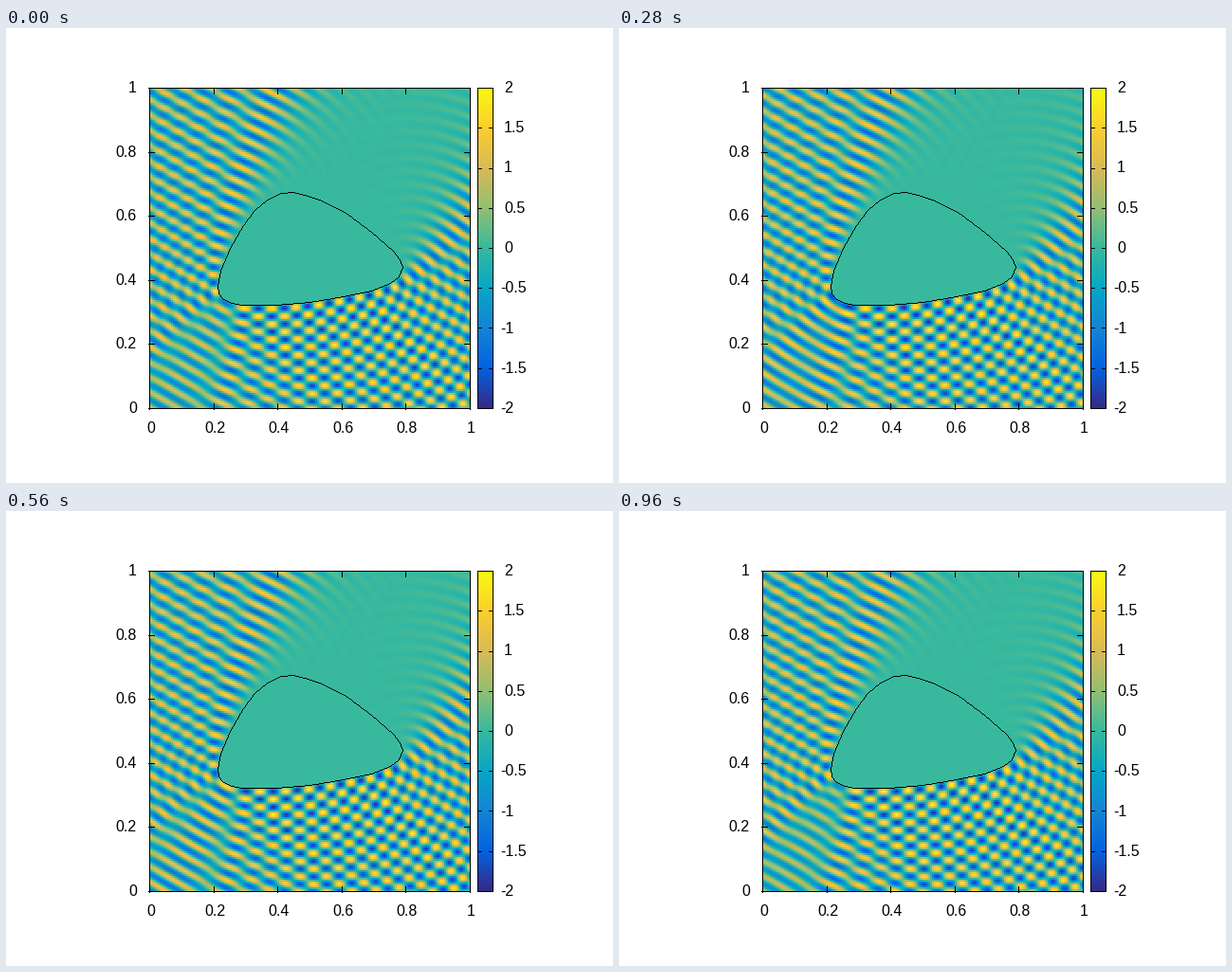
A matplotlib script for the animation above (1000 ms loop, 640 px wide and 480 px high).

```python
import numpy as np
import matplotlib.pyplot as plt
from matplotlib.animation import FuncAnimation
from matplotlib.colors import LinearSegmentedColormap
from matplotlib.path import Path

FRAMES, INTERVAL = 25, 40
WIDTH, HEIGHT = 640, 480
LEFT, RIGHT, TOP, BOTTOM = 151, 489, 63, 401
BAR_LEFT, BAR_RIGHT = 497, 513
SIZE = RIGHT - LEFT
CELLS = SIZE // 2
K = 48 * np.pi
DIRECTION = np.exp(1j * np.pi / 3)

plt.rcParams["font.family"] = "Liberation Sans"
PALETTE = LinearSegmentedColormap.from_list("waves", [
    "#352a87", "#0363e1", "#1485d4", "#06a7c6", "#38b99e",
    "#92bf73", "#d9ba56", "#fcce2e", "#f9fb0e"], N=512)

# Obstacle outline in stage pixels, starting at its left end
OUTLINE = np.array([
    (223, 272), (224, 280), (229, 286), (238, 290), (248, 292), (285, 292),
    (320, 289), (350, 284), (385, 277), (405, 269), (414, 262), (418, 252),
    (415, 244), (408, 235), (385, 215), (357, 194), (330, 181), (315, 176),
    (302, 173), (290, 174), (275, 181), (262, 192), (250, 208), (236, 232),
    (226, 256), (223, 272)], float)


def to_plane(points):
    """Stage pixels to complex positions in the unit square."""
    return ((points[:, 0] - LEFT) + 1j * (BOTTOM - points[:, 1])) / SIZE


def smooth_curve(corners, count, softness=0.012):
    """Smoothed closed curve and its unit tangent."""
    lengths = np.r_[0, np.cumsum(abs(np.diff(corners)))]
    s = np.arange(count) / count * lengths[-1]
    wave = 2j * np.pi * np.fft.fftfreq(count, lengths[-1] / count)
    spectrum = np.fft.fft(np.interp(s, lengths, corners))
    spectrum = spectrum * np.exp((wave * softness) ** 2 / 2)
    tangent = np.fft.ifft(wave * spectrum)
    return np.fft.ifft(spectrum), tangent / abs(tangent)


def hankel(x):
    """Outgoing Hankel function of order 0 by Gauss-Hermite quadrature."""
    nodes, weights = np.polynomial.hermite.hermgauss(12)
    total = sum(2 * w / np.sqrt(1 + 0.5j * n * n / x)
                for n, w in zip(nodes, weights) if n > 0)
    return np.sqrt(2 / x) / np.pi * np.exp(1j * (x - np.pi / 4)) * total


def incident(z):
    return np.exp(1j * K * (z * DIRECTION.conjugate()).real)


def total_field():
    """Plane wave scattered by a sound-soft obstacle, from point sources."""
    edge, tangent = smooth_curve(to_plane(OUTLINE), 640)
    sources = (edge + 0.018j * tangent)[::2]
    matrix = hankel(K * abs(edge[:, None] - sources))
    strengths = np.linalg.lstsq(matrix, -incident(edge), rcond=1e-7)[0]

    axis = (np.arange(CELLS) + 0.5) / CELLS
    z = (axis + 1j * axis[::-1, None]).ravel()
    outline = to_plane(OUTLINE)
    shape = Path(np.c_[outline.real, outline.imag])
    outside = ~shape.contains_points(np.c_[z.real, z.imag])
    field = np.zeros(z.size, complex)
    for part in np.array_split(np.flatnonzero(outside), 40):
        distance = abs(z[part, None] - sources)
        field[part] = incident(z[part]) + hankel(K * distance) @ strengths
    return field.reshape(CELLS, CELLS)


fig = plt.figure(figsize=(WIDTH / 100, HEIGHT / 100), dpi=100,
                 facecolor="white")
ax = fig.add_axes([0, 0, 1, 1])
ax.axis("off")
ink = np.zeros((HEIGHT, WIDTH, 4))


def line(x0, y0, x1, y1):
    """One-pixel black line without smoothing."""
    steps = int(max(abs(x1 - x0), abs(y1 - y0))) + 1
    xs = np.rint(np.linspace(x0, x1, steps)).astype(int)
    ys = np.rint(np.linspace(y0, y1, steps)).astype(int)
    ink[ys, xs, 3] = 1


def box(x0, x1):
    for x in (x0, x1):
        line(x, TOP, x, BOTTOM)
    for y in (TOP, BOTTOM):
        line(x0, y, x1, y)


def label(x, y, text, align):
    ax.text(x, y, text, fontsize=11.52, ha=align, va="baseline")


def show(data, x0, x1):
    return ax.imshow(data, cmap=PALETTE, vmin=-2, vmax=2,
                     extent=(x0 + 0.5, x1 + 0.5, BOTTOM + 0.5, TOP + 0.5),
                     interpolation="nearest")


field = total_field()
image = show(field.real, LEFT, RIGHT)
show(np.linspace(2, -2, SIZE)[:, None], BAR_LEFT, BAR_RIGHT)

box(LEFT, RIGHT)
box(BAR_LEFT, BAR_RIGHT)
for start, end in zip(OUTLINE, OUTLINE[1:]):
    line(*start, *end)

for value in np.linspace(0, 1, 6):
    x, y = LEFT + value * SIZE, BOTTOM - value * SIZE
    line(x, BOTTOM + 1, x, BOTTOM - 5)
    line(x, TOP, x, TOP + 6)
    line(LEFT - 1, y, LEFT + 5, y)
    line(RIGHT, y, RIGHT - 6, y)
    label(x + 1.5, 427, f"{value:.1g}", "center")
    label(138, y + 5, f"{value:.1g}", "right")

for value in np.linspace(-2, 2, 9):
    y = BOTTOM - (value + 2) / 4 * SIZE
    line(BAR_LEFT, y, BAR_LEFT + 4, y)
    line(BAR_RIGHT, y, BAR_RIGHT - 4, y)
    label(521.5 if value < 0 else 525, y + 5, f"{value:g}", "left")

ax.imshow(ink, extent=(0, WIDTH, HEIGHT, 0), interpolation="nearest", zorder=3)
ax.set_aspect("auto")
ax.set_xlim(0, WIDTH)
ax.set_ylim(HEIGHT, 0)


def update(frame):
    image.set_data((field * np.exp(-2j * np.pi * frame / FRAMES)).real)
    return [image]


animation = FuncAnimation(fig, update, frames=FRAMES, interval=INTERVAL,
                          repeat=True, repeat_delay=0)
plt.show()
```
